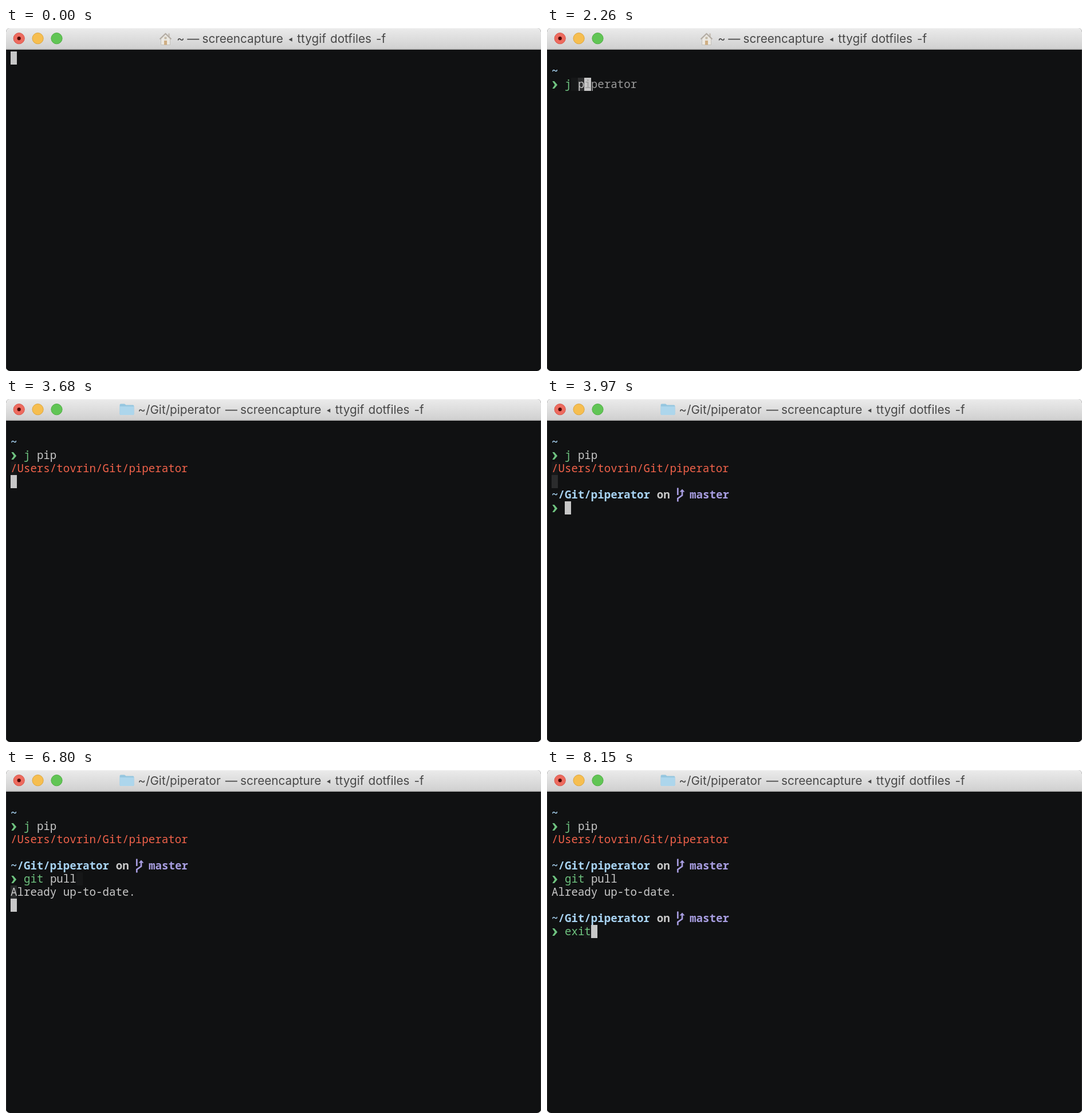
These frames come from a looping animation (934 by 600 pixels, 8.25 s). An HTML page:

```html
<!DOCTYPE html>
<html lang="en">
<head>
<meta charset="utf-8">
<title>Terminal session</title>
<style>
  html, body { margin: 0; width: 100%; height: 100%; overflow: hidden; background: #fff; }
  svg { display: block; width: 934px; height: 600px; }
  text { white-space: pre; }
  #screen text { font: 500 19.13px "Noto Sans Mono", "DejaVu Sans Mono", monospace; font-variant-ligatures: none; }
  #screen text.bold { font-weight: 700; }
  #title text { font: 400 20.7px Inter, Roboto, sans-serif; fill: #484848; }
</style>
</head>
<body>
<svg viewBox="0 0 934 600">
  <defs>
    <linearGradient id="bar" x1="0" y1="0" x2="0" y2="1">
      <stop offset="0" stop-color="#ebebeb"/>
      <stop offset="1" stop-color="#d0d0d0"/>
    </linearGradient>
    <clipPath id="window"><rect width="934" height="600" rx="7"/></clipPath>
  </defs>
  <g clip-path="url(#window)">
    <rect width="934" height="600" fill="#101112"/>
    <path d="M.5 38V600M933.5 38V600" stroke="#29292a"/>
    <rect width="934" height="37" fill="url(#bar)"/>
    <rect width="934" height="1" fill="#f4f4f4"/>
    <rect y="36.5" width="934" height="1.5" fill="#adadad"/>
    <g stroke-width="1">
      <circle cx="22.7" cy="18.2" r="9.6" fill="#ed6b5f" stroke="#d9574c"/>
      <circle cx="55.6" cy="18.2" r="9.6" fill="#f6be50" stroke="#dda63e"/>
      <circle cx="88.5" cy="18.2" r="9.6" fill="#61c555" stroke="#4fad43"/>
    </g>
    <circle cx="22.7" cy="18.2" r="3.1" fill="#4a0804"/>
    <g id="title"></g>
    <g id="screen"></g>
  </g>
</svg>
<script>
const LOOP = 8250;
const CELL = 11.48, LINE = 23, LEFT = 8, TOP = 41;
const WHITE = '#c9c9c9', GREY = '#9b9b9b', GREEN = '#6ec27f',
      RED = '#f0624a', BLUE = '#a8d3f2', PURPLE = '#a79de0';

// Each step changes only the listed parts; cur is [row, column].
const steps = [
  [0, { cur: [0, 0] }],
  [510, { home: true, cur: [2, 2] }],
  [590, {}],
  [660, {}],
  [1740, { jump: 'j', jumpHint: ' uglifier', cur: [2, 3] }],
  [1870, { jump: 'j ', jumpHint: 'uglifier', cur: [2, 4] }],
  [2260, { jump: 'j p', jumpHint: 'iperator', cur: [2, 5] }],
  [2470, { jump: 'j pi', jumpHint: 'perator', cur: [2, 6] }],
  [3180, { jump: 'j pip', jumpHint: 'erator', cur: [2, 7] }],
  [3400, { jumpHint: '' }],
  [3500, { cur: [3, 0] }],
  [3590, { path: true, cur: [4, 0] }],
  [3680, { inRepo: true }],
  [3780, {}],
  [3970, { repo: true, cur: [6, 2] }],
  [4560, { pull: 'g', pullHint: 'it pull', cur: [6, 3] }],
  [5210, { pull: 'git pull', pullHint: '', cur: [6, 10] }],
  [5730, { cur: [7, 0] }],
  [5830, {}],
  [6800, { reply: true, cur: [8, 0] }],
  [6900, {}],
  [7000, {}],
  [7170, { again: true, cur: [10, 2] }],
  [7610, { exit: 'e', exitHint: 'xit', cur: [10, 3] }],
  [7800, { exit: 'ex', exitHint: 'it', cur: [10, 4] }],
  [7890, { exit: 'exi', exitHint: 't', cur: [10, 5] }],
  [8080, { exit: 'exit', exitHint: '', cur: [10, 6] }],
  [8150, {}]
];

// The cell the cursor has just left keeps a dim trail, then a fainter one.
const states = [];
steps.forEach(([time, change], i) => {
  const last = states[i - 1] || {};
  states.push({
    ...last, ...change, time,
    trail: i && change.cur ? last.cur : null,
    faint: last.trail || last.faint
  });
});

const colX = col => LEFT + CELL * col;
const rowY = row => TOP + LINE * row;

function say(row, col, text, color, bold) {
  if (!text) return '';
  return `<text x="${colX(col)}" y="${rowY(row) + 18}" fill="${color}"${bold ? ' class="bold"' : ''}>${text}</text>`;
}

function block(cell, color) {
  if (!cell) return '';
  const x = Math.round(colX(cell[1]));
  const width = Math.round(colX(cell[1] + 1)) - x;
  return `<rect x="${x}" y="${rowY(cell[0])}" width="${width}" height="${LINE}" fill="${color}"/>`;
}

function chevron(row) {
  return `<path transform="translate(0 ${rowY(row)})" fill="${GREEN}" d="M9.3 6h3.5l5.4 6.5-5.4 6.5H9.3l4.3-6.5z"/>`;
}

function branch(row) {
  return `<g transform="translate(0 ${rowY(row)})" fill="none" stroke="${PURPLE}" stroke-width="2.7">
    <path d="M228.3 -.5V12M228.3 23.5V18L236 12.5V5"/>
    <path d="M231.5 6.5L236 1.5L240.5 6.5z" fill="${PURPLE}" stroke="none"/></g>`;
}

function repoPrompt(row) {
  return say(row, 0, '~/Git/piperator', BLUE, true) + say(row, 16, 'on', WHITE, true) +
    branch(row) + say(row, 21, 'master', PURPLE, true) + chevron(row + 1);
}

function command(row, typed = '', hint, color = GREEN) {
  const [name, ...rest] = typed.split(' ');
  return say(row, 2, name, color) +
    say(row, 3 + name.length, rest.join(' '), WHITE) +
    say(row, 2 + typed.length, hint, GREY);
}

function screen(s) {
  const exitColor = s.exit === 'e' || s.exit === 'exi' ? RED : GREEN;
  return [
    block(s.faint, '#161718'),
    block(s.trail, '#2b2c2d'),
    block(s.cur, '#c7c7c7'),
    s.home ? say(1, 0, '~', BLUE, true) + chevron(2) : '',
    command(2, s.jump, s.jumpHint),
    s.path ? say(3, 0, '/Users/tovrin/Git/piperator', RED) : '',
    s.repo ? repoPrompt(5) : '',
    command(6, s.pull, s.pullHint),
    s.reply ? say(7, 0, 'Already up-to-date.', WHITE) : '',
    s.again ? repoPrompt(9) : '',
    command(10, s.exit, s.exitHint, exitColor)
  ].join('');
}

const house = `<g>
  <path d="M270.5 19L278.5 11l8 8v10.5h-16z" fill="#ebe8e2" stroke="#bcb8b0" stroke-width=".8"/>
  <path d="M283 9.5h3v6h-3z" fill="#c9c3bb"/>
  <path d="M268.5 19.5L278.5 9.8l10 9.7" fill="none" stroke="#b3aca4" stroke-width="2"/>
  <path d="M276 22h5v7.5h-5z" fill="#cfae83"/>
  <path d="M276.5 15.5h4v4h-4z" fill="#c3b9a6"/></g>`;

const folder = `<g>
  <path d="M198.5 10.5q0-2 2-2h6.5l2.5 2h12q2 0 2 2V26q0 2-2 2h-21q-2 0-2-2z" fill="#96c7e0"/>
  <path d="M198.5 13h25v13q0 2-2 2h-21q-2 0-2-2z" fill="#add6ec"/></g>`;

function title(s) {
  const shift = s.inRepo ? 66.5 : 0;
  const word = (x, text) => `<text x="${x}" y="26">${text}</text>`;
  return (s.inRepo ? folder + word(230.3, '~/Git/piperator') : house + word(298, '~')) +
    `<g transform="translate(${shift} 0)">` +
    `<path d="M316.3 19.7h21" stroke="#484848" stroke-width="1.7"/>` +
    word(342.5, 'screencapture') +
    `<path d="M493.5 20.3l6.2-3.5v7z" fill="#484848"/>` +
    word(508.3, 'ttygif') + word(566, 'dotfiles') + word(646, '-f') + '</g>';
}

const titleBox = document.getElementById('title');
const screenBox = document.getElementById('screen');
let shown;

function render(now) {
  const t = now % LOOP;
  const state = states.filter(s => s.time <= t).pop();
  if (state !== shown) {
    titleBox.innerHTML = title(state);
    screenBox.innerHTML = screen(state);
    shown = state;
  }
}

const start = performance.now();
function tick() {
  render(performance.now() - start);
  requestAnimationFrame(tick);
}
tick();
</script>
</body>
</html>
```
